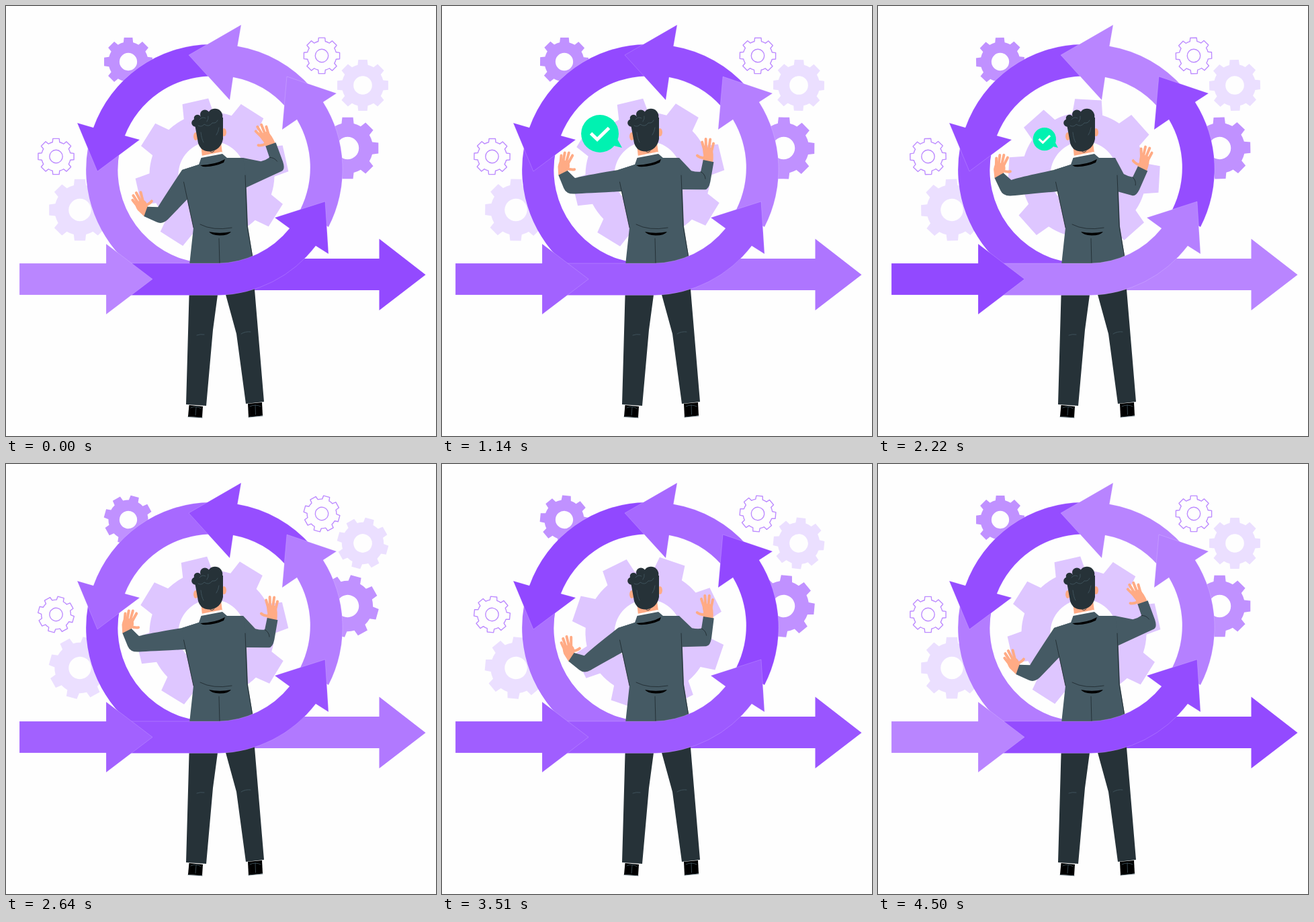
Animation of 640 by 640 pixels, one loop 4530 ms. Source, as an HTML page:

```html
<!DOCTYPE html>
<html lang="en">
<head>
<meta charset="utf-8">
<title>Agile loop</title>
<style>
  html, body { margin: 0; width: 100%; height: 100%; overflow: hidden; background: #fefefe; }
  svg { display: block; width: 100vw; height: 100vh; }
  .skin { fill: #ffab85; }
  .finger { fill: none; stroke: #ffab85; stroke-width: 4; stroke-linecap: round; stroke-linejoin: round; }
  .coat { fill: #455a64; }
  .dark { fill: #263238; }
  .line { fill: none; stroke: #1d272c; stroke-width: .8; stroke-linecap: round; }
  .soft { fill: none; stroke: #455a64; stroke-width: .8; stroke-linecap: round; }
  .edge { stroke: #fff; stroke-opacity: .35; stroke-width: .5; }
  .wire { fill: none; stroke: #bd8cff; stroke-width: 1.4; stroke-linejoin: round; }
</style>
</head>
<body>
<svg viewBox="0 0 640 640" xmlns="http://www.w3.org/2000/svg">
  <g id="gears"></g>

  <path id="G" d="M122 211A187 187 0 0 0 190 390H290V382.500A139.500 139.500 0 0 1 169 217Z"/>
  <path id="F" class="edge" d="M304 57A187 187 0 0 0 130 181L106 174 136 246 199 199 177 193A139.500 139.500 0 0 1 304 104.500Z"/>
  <path id="E" class="edge" d="M272 73L350 28 344.500 59.700A187 187 0 0 1 455 122L417 151A139.500 139.500 0 0 0 338 106L333 140Z"/>
  <path id="D" class="edge" d="M480 329A187 187 0 0 0 472 143L492 130 418 105 411 184 433 169A139.500 139.500 0 0 1 438 303Z"/>
  <path id="C" d="M400 376H555.500V346.500L624.500 400 555.500 453V423H362Z"/>

  <g id="bubble" fill="#00f2b1">
    <circle cx="235" cy="190" r="28"/>
    <path d="M261 198L268 211 252 207Z"/>
    <path d="M221.500 189.500L231 198.500 248.500 181.500" fill="none" stroke="#fff" stroke-width="5"/>
  </g>

  <g id="man">
    <path class="dark" d="M273 415H317L308 482 298 595 268 593Z"/>
    <path class="dark" d="M323 415L369 410 384 589 357 592 343 488Z"/>
    <path class="soft" d="M284 490Q289 488 295 489M350 488Q356 484 364 485"/>
    <path d="M272.500 594L293 596 292 612.500 271 611Z"/>
    <path d="M360 592L381 590 382 609.500 361 612Z"/>
    <path class="soft" d="M271 611.500L292 612.800M361 612L382 610M283 597L282 609M371 594L371.500 608M275 598Q283 594 290 599M363 596Q371 592 379 596"/>

    <g id="handL">
      <path class="skin" d="M-6 5L-9 -8Q-9 -17 -5 -19L6 -18Q9 -12 8 -9L6 -3Z"/>
      <path class="finger" d="M-6 -14L-7 -25M-2.500 -16L-2.500 -30M2 -16L3.500 -31M5 -15L9.500 -28M4 -8Q11 -6 16 -8"/>
    </g>
    <path id="armL" class="coat"/>
    <g id="handR">
      <path class="skin" d="M-8 2L-9 -7Q-13 -16 -11 -19L1 -20Q6 -13 7 2Z"/>
      <path class="finger" d="M-9 -14L-15 -25.500M-7 -16L-10.500 -31M-3 -16L-4 -32M1.500 -14L2 -27M-7 -3Q-14 -2 -18 -4.500"/>
    </g>
    <path id="armR" class="coat"/>

    <path class="skin" d="M290 205L320 203 322 219 292 225Z"/>
    <path d="M291 223L321 217 324 221 290 228Z" fill="#fff"/>
    <path class="coat" d="M262 244L287 236 290.500 226 322 220 329 226H353L357 250 360 328 367 372 370 390H272.500L279 330 267 276Z"/>
    <path class="line" d="M264.500 262L279 330M356 252L359 328 367 374M317 346L318 384M289 325Q308 335 336 330"/>
    <path d="M289 237Q312 236 326 228L324 233Q309 240 293 239Z"/>
    <path d="M302 336Q318 339.500 335 336Q331 341.500 318 341.500Q306 341 302 336Z"/>
    <path id="foldR" class="line"/>

    <ellipse class="skin" cx="282.500" cy="194" rx="3.500" ry="6"/>
    <ellipse class="skin" cx="324.500" cy="188" rx="3.500" ry="6"/>
    <g class="dark">
      <path d="M281 176L290 164 323 166 323 198Q320 214 304 216.500Q290 217 286 204Z"/>
      <circle cx="282" cy="174" r="5.800"/>
      <circle cx="285" cy="167" r="5.300"/>
      <circle cx="296" cy="161.500" r="7"/>
      <circle cx="311" cy="164" r="11.300"/>
    </g>
    <path class="soft" d="M286 178Q291 181 295 176Q302 181 307 174Q313 175 315 170M288 169Q292 164 297 167M299 172Q302 168 301 164M317 181Q316 188 313 192M290 188Q291 198 294 203"/>
    <path class="line" d="M304 217Q307 219 310 216"/>
  </g>

  <path id="B" class="edge" d="M170 383H316A139.500 139.500 0 0 0 422 331L400 315 475 291 480 369 461 357A187 187 0 0 1 316 430.500H170Z"/>
  <path id="A" class="edge" d="M20 383H149V354L218 406.500 149 459V430H20Z"/>
</svg>
<script>
const LOOP = 4530, BEAT = 1500, TAU = 2 * Math.PI;
const $ = id => document.getElementById(id);
const polar = (r, deg) => {
  const a = deg * TAU / 360;
  return (r * Math.sin(a)).toFixed(2) + ' ' + (-r * Math.cos(a)).toFixed(2);
};

// Eight-toothed gear around the origin, with a round hole
function gearPath(R, root, hole) {
  let d = '';
  for (let a = 0; a < 360; a += 45) {
    d += `${a ? 'L' : 'M'}${polar(root, a - 14)}L${polar(R, a - 10)}L${polar(R, a + 10)}` +
      `L${polar(root, a + 14)}A${root} ${root} 0 0 1 ${polar(root, a + 31)}`;
  }
  return d + `ZM${hole} 0A${hole} ${hole} 0 1 0 ${-hole} 0A${hole} ${hole} 0 1 0 ${hole} 0Z`;
}

// Returns a function that turns the new gear to an angle
function addGear(x, y, R, fill, root = R * .81, hole = R * .36) {
  const p = document.createElementNS('http://www.w3.org/2000/svg', 'path');
  p.setAttribute('d', gearPath(R, root, hole));
  p.setAttribute('fill-rule', 'evenodd');
  if (fill) p.setAttribute('fill', fill);
  else p.setAttribute('class', 'wire');
  $('gears').append(p);
  return a => p.setAttribute('transform', `translate(${x} ${y}) rotate(${a})`);
}

const violet = '#c091ff', pale = '#ebdfff';
const small = [
  addGear(182, 83, 36.5, violet),
  addGear(531, 118, 38.5, pale),
  addGear(508.5, 211.5, 46.5, violet),
  addGear(110, 303.5, 46.5, pale),
  addGear(470, 74, 27),
  addGear(74.5, 224, 27)
];
const big = addGear(306.5, 251.5, 114, '#dec6ff', 93, 50);

// Cosine of phase p that is 1 at the given peak
const wave = (p, peak) => Math.cos(TAU * (p - peak));
const smooth = x => (x = Math.min(1, Math.max(0, x)), x * x * (3 - 2 * x));

// Local frame of a cuff: origin and rotation in degrees
function frame(x, y, a) {
  const c = Math.cos(a * TAU / 360), s = Math.sin(a * TAU / 360);
  const at = (u, v) => (x + u * c - v * s).toFixed(2) + ' ' + (y + u * s + v * c).toFixed(2);
  at.transform = `translate(${x} ${y}) rotate(${a})`;
  return at;
}

// Cuff height drives its sideways arc and its tilt
function moveLeft(p) {
  const y = 277 + 42 * wave(p, .13), tilt = 20 - .75 * (y - 235);
  const L = frame(180 + (y - 250) ** 2 / 112, y, tilt);
  const drop = Math.max(0, -tilt - 10) * .5;
  $('handL').setAttribute('transform', L.transform);
  $('armL').setAttribute('d', `M290 235L262 244Q${L(30, -1)} ${L(19, 4.5)}L${L(6, -4.5)} ${L(-6, 4.5)}` +
    `L${L(5, 22)}Q${L(10, 30)} ${L(21, 28)}Q${L(30, 26)} ${267 + drop * .25} ${276 + drop}L290 270Z`);
}

function moveRight(p) {
  const y = 224.5 + 20 * wave(p, .56), tilt = 1.22 * (y - 221);
  const R = frame(397 - (y - 224) ** 2 / 110, y, tilt);
  const low = 270 + Math.max(0, tilt) * .25;
  $('handR').setAttribute('transform', R.transform);
  $('armR').setAttribute('d', `M340 226H353L${R(-22, 19.5)}Q${R(-14, 20)} ${R(-8, 18)}L${R(-8, 0)} ${R(8, 0)}` +
    `L${R(9, 30)}Q${R(9, 42)} ${R(3, 43)}L358 ${low}H345Z`);
  $('foldR').setAttribute('d', `M${R(-8, 18)}Q${R(-1, 20)} ${R(1, 27)}`);
}

// Each arrow pulses: cycles per loop and phase of its lightest moment
const pulse = {
  A: [3, .03], B: [5, .56], C: [1, .43], D: [3, .87], E: [6, .89], F: [4, .57], G: [3, .12]
};

function tintArrows(t) {
  for (const [id, [cycles, peak]] of Object.entries(pulse)) {
    const u = .5 + .5 * wave(t / LOOP * cycles, peak);
    $(id).setAttribute('fill', `rgb(${145 + 41 * u},${71 + 64 * u},255)`);
  }
}

function draw(t) {
  const p = t / BEAT;
  small.forEach(turn => turn(t * .04));
  big(-2.5 - 36 * wave(p, .205));
  moveLeft(p);
  moveRight(p);
  tintArrows(t);
  const s = smooth((t - 750) / 400) * (1 - smooth((t - 2030) / 450));
  $('bubble').setAttribute('transform', `translate(268 211) scale(${s}) translate(-268 -211)`);
}

const start = performance.now();
function tick() {
  draw((performance.now() - start) % LOOP);
  requestAnimationFrame(tick);
}
tick();
</script>
</body>
</html>
```
